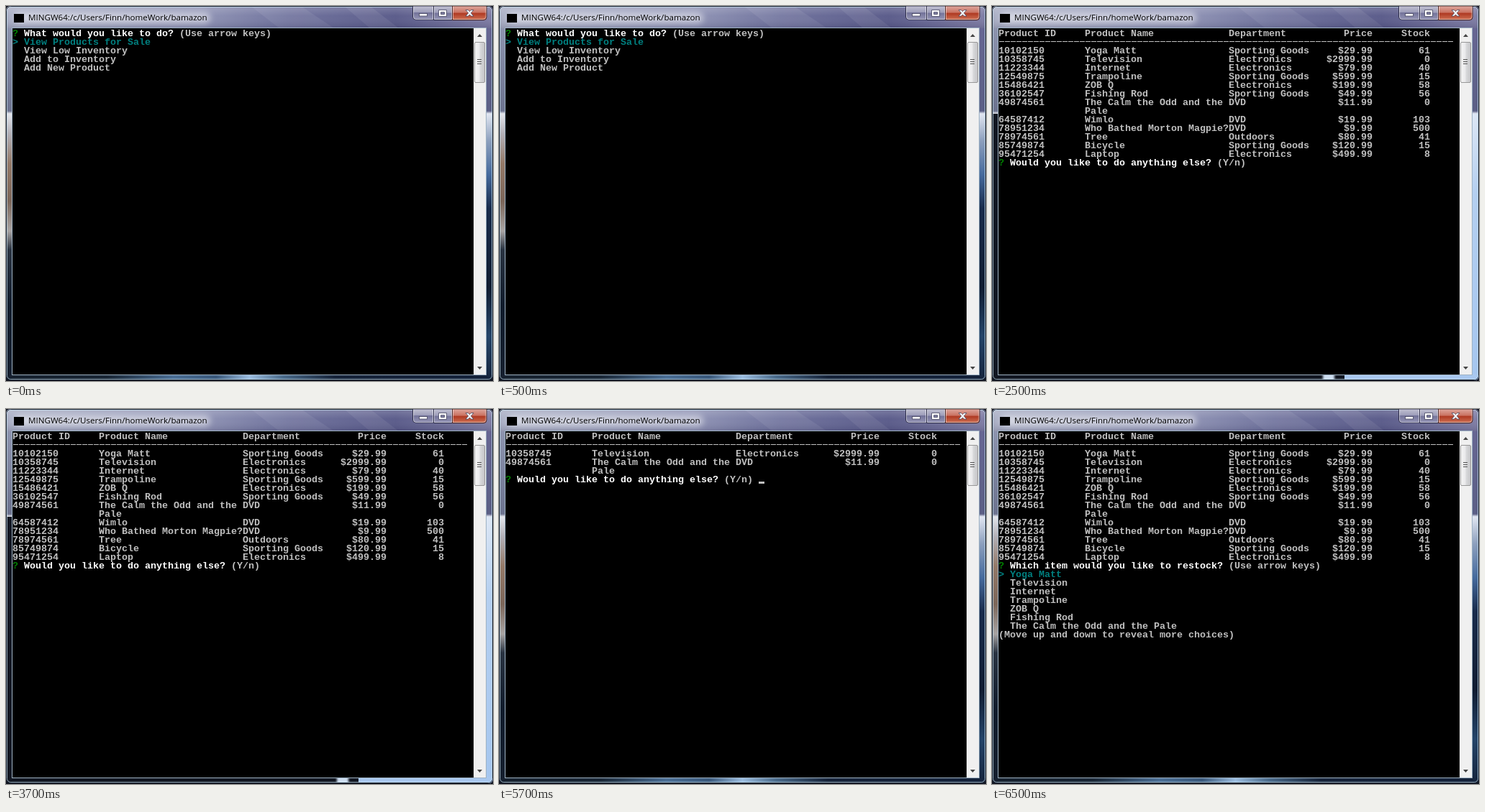
Animation, 677 px wide and 522 px high, one loop 8 s. Source, as an HTML page:

```html
<!DOCTYPE html>
<html lang="en">
<head>
<meta charset="utf-8">
<title>Terminal store manager</title>
<style>
  html, body { margin: 0; width: 100%; height: 100%; overflow: hidden; background: #10141f; }
  svg { display: block; }
  .mono text { font: bold 13.333px "Liberation Mono", "Courier New", monospace; white-space: pre; }
  .title { font: 11.6px "Open Sans", "Noto Sans", sans-serif; }
</style>
</head>
<body>
<svg width="677" height="522" viewBox="0 0 677 522">
  <defs>
    <linearGradient id="top">
      <stop offset="0" stop-color="#a9aec4"/>
      <stop offset=".4" stop-color="#8d91b3"/>
      <stop offset=".58" stop-color="#6b6e9a"/>
      <stop offset=".8" stop-color="#565787"/>
      <stop offset="1" stop-color="#7d7ba3"/>
    </linearGradient>
    <linearGradient id="shade" x2="0" y2="1">
      <stop offset="0" stop-color="#fff" stop-opacity=".22"/>
      <stop offset=".45" stop-color="#fff" stop-opacity=".04"/>
      <stop offset="1" stop-color="#15163a" stop-opacity=".15"/>
    </linearGradient>
    <linearGradient id="left" x2="0" y2="522" gradientUnits="userSpaceOnUse">
      <stop offset=".05" stop-color="#8f96b0"/>
      <stop offset=".28" stop-color="#6d7490"/>
      <stop offset=".287" stop-color="#e4e6ec"/>
      <stop offset=".34" stop-color="#b3b1b8"/>
      <stop offset=".42" stop-color="#957a68"/>
      <stop offset=".52" stop-color="#7d675a"/>
      <stop offset=".6" stop-color="#a9a5a4"/>
      <stop offset=".65" stop-color="#2a3442"/>
      <stop offset=".8" stop-color="#111c2c"/>
      <stop offset="1" stop-color="#16202f"/>
    </linearGradient>
    <linearGradient id="right" x2="0" y2="522" gradientUnits="userSpaceOnUse">
      <stop offset=".05" stop-color="#676693"/>
      <stop offset=".28" stop-color="#5b5f85"/>
      <stop offset=".287" stop-color="#e2e7f2"/>
      <stop offset=".36" stop-color="#8c9fbd"/>
      <stop offset=".45" stop-color="#456a9d"/>
      <stop offset=".54" stop-color="#182b4b"/>
      <stop offset=".75" stop-color="#101c31"/>
      <stop offset=".88" stop-color="#244469"/>
      <stop offset="1" stop-color="#15233b"/>
    </linearGradient>
    <linearGradient id="bottom">
      <stop offset="0" stop-color="#17222f"/>
      <stop offset=".2" stop-color="#1a2736"/>
      <stop offset=".34" stop-color="#4b6f96"/>
      <stop offset=".43" stop-color="#3a597c"/>
      <stop offset=".5" stop-color="#9dbfe2"/>
      <stop offset=".57" stop-color="#4b6c8c"/>
      <stop offset=".68" stop-color="#17243a"/>
      <stop offset="1" stop-color="#15233b"/>
    </linearGradient>
    <linearGradient id="sky" x2="0" y2="1">
      <stop offset="0" stop-color="#dde7f5"/>
      <stop offset=".3" stop-color="#b4cff0"/>
      <stop offset="1" stop-color="#a5c6ef"/>
    </linearGradient>
    <linearGradient id="glass" x2="0" y2="1">
      <stop offset="0" stop-color="#c2c2d3"/>
      <stop offset=".48" stop-color="#9b9bb8"/>
      <stop offset=".5" stop-color="#727299"/>
      <stop offset="1" stop-color="#9797b7"/>
    </linearGradient>
    <linearGradient id="red" x2="0" y2="1">
      <stop offset="0" stop-color="#dfa89f"/>
      <stop offset=".48" stop-color="#c9705f"/>
      <stop offset=".5" stop-color="#ad3620"/>
      <stop offset="1" stop-color="#cf7255"/>
    </linearGradient>
    <linearGradient id="thumb">
      <stop offset="0" stop-color="#f5f5f5"/>
      <stop offset=".48" stop-color="#e9e9eb"/>
      <stop offset=".52" stop-color="#d9dadc"/>
      <stop offset="1" stop-color="#c5c5c8"/>
    </linearGradient>
    <filter id="blur" x="-20%" y="-80%" width="140%" height="260%"><feGaussianBlur stdDeviation="4"/></filter>
    <filter id="soft" x="-50%" y="-50%" width="200%" height="200%"><feGaussianBlur stdDeviation="1.5"/></filter>
    <clipPath id="frame"><rect width="677" height="521" rx="6"/></clipPath>
  </defs>

  <rect width="677" height="522" fill="#10141f"/>
  <g clip-path="url(#frame)">
    <rect width="20" height="522" fill="url(#left)"/>
    <rect x="657" width="20" height="522" fill="url(#right)"/>
    <rect x="8" y="512" width="661" height="10" fill="url(#bottom)"/>
    <g id="daylight">
      <path d="M0 150h20v362h637v10H0z" fill="#121722"/>
      <rect x="657" y="150" width="20" height="372" fill="url(#sky)"/>
      <rect x="490" y="512" width="187" height="10" fill="#a9c8ef"/>
      <rect x="460" y="512" width="16" height="10" fill="#cfdff2" filter="url(#soft)"/>
    </g>
    <rect width="677" height="31" fill="url(#top)"/>
    <path d="M340 0h70l46 31h-76zM470 0h36l40 31h-40z" fill="#fff" opacity=".07"/>
    <rect width="677" height="31" fill="url(#shade)"/>
    <rect x="12" y="9" width="272" height="15" rx="7" fill="#fff" opacity=".5" filter="url(#blur)"/>
  </g>
  <rect x=".5" y=".5" width="676" height="520" rx="6" fill="none" stroke="#1b2130"/>
  <rect x="1.5" y="1.5" width="674" height="518" rx="5" fill="none" stroke="#c4e0ee" stroke-opacity=".7"/>

  <rect x="11" y="11" width="14" height="12" fill="#000"/>
  <text class="title" x="31" y="20">MINGW64:/c/Users/Finn/homeWork/bamazon</text>

  <g stroke="#2b2b48">
    <path d="M565.5 0v15q0 4 4 4H594.5V0z" fill="url(#glass)"/>
    <path d="M594.5 0V19.5H620.5V0z" fill="url(#glass)"/>
    <path d="M620.5 0V19.5H664q4 0 4-4V0z" fill="url(#red)" stroke="#47201f"/>
  </g>
  <path d="M566.5 1v14q0 3.5 3.5 3.5H593.5V1M595.5 1V18.5H619.5V1M621.5 1V18.5H663q4 0 4-3.5V1" fill="none" stroke="#fff" stroke-opacity=".5"/>
  <g fill="#fff" stroke="#45455f" stroke-width=".8">
    <rect x="574.5" y="10.5" width="11" height="3.5"/>
    <path fill-rule="evenodd" d="M601.5 5.5h11v9h-11zM604.5 8.5v3h5v-3z"/>
    <path d="M639 5.5h3.5l2 2.200 2-2.200h3.5l-3.7 4.300 3.7 4.300h-3.5l-2-2.200-2 2.200H639l3.7-4.300z"/>
  </g>

  <rect x="8.5" y="30.5" width="659" height="483" fill="#000" stroke="#9fb3c4"/>
  <rect x="650" y="31" width="17" height="482" fill="#f0f0f0"/>
  <path d="M655 43l3.5-4 3.5 4zM655 502l3.5 4 3.5-4z" fill="#444"/>
  <rect x="651.5" y="50.5" width="14" height="56" rx="1.5" fill="url(#thumb)" stroke="#979797"/>
  <path d="M655 74.5h6M655 77.5h6M655 80.5h6" stroke="#555"/>
  <g id="screens" class="mono"></g>
</svg>

<script>
const NS = "http://www.w3.org/2000/svg";
const GREY = "#c0c0c0", WHITE = "#fff", TEAL = "#008080", GREEN = "#008000";
const CELL = 8, LINE = 12, LEFT = 9, BASE = 42;
const LOOP = 8000;

const products = [
  ["10102150", "Yoga Matt", "Sporting Goods", "$29.99", "61"],
  ["10358745", "Television", "Electronics", "$2999.99", "0"],
  ["11223344", "Internet", "Electronics", "$79.99", "40"],
  ["12549875", "Trampoline", "Sporting Goods", "$599.99", "15"],
  ["15486421", "ZOB Q", "Electronics", "$199.99", "58"],
  ["36102547", "Fishing Rod", "Sporting Goods", "$49.99", "56"],
  ["49874561", "The Calm the Odd and the Pale", "DVD", "$11.99", "0"],
  ["64587412", "Wimlo", "DVD", "$19.99", "103"],
  ["78951234", "Who Bathed Morton Magpie?", "DVD", "$9.99", "500"],
  ["78974561", "Tree", "Outdoors", "$80.99", "41"],
  ["85749874", "Bicycle", "Sporting Goods", "$120.99", "15"],
  ["95471254", "Laptop", "Electronics", "$499.99", "8"]
];

function add(parent, tag, attrs, content = "") {
  const el = document.createElementNS(NS, tag);
  for (const key in attrs) el.setAttribute(key, attrs[key]);
  el.textContent = content;
  parent.appendChild(el);
  return el;
}

function put(g, col, row, str, fill = GREY) {
  add(g, "text", { x: LEFT + col * CELL, y: BASE + row * LINE, fill }, str);
}

function prompt(g, row, question, hint) {
  put(g, 0, row, "?", GREEN);
  put(g, 2, row, question, WHITE);
  put(g, question.length + 3, row, hint);
}

// First choice is the highlighted one
function choices(g, row, items) {
  put(g, 0, row, ">", TEAL);
  items.forEach((item, i) => put(g, 2, row + i, item, i ? GREY : TEAL));
}

function tableRow(g, row, [id, name, dept, price, stock]) {
  put(g, 0, row, id);
  put(g, 15, row, name);
  put(g, 40, row, dept);
  put(g, 65 - price.length, row, price);
  put(g, 75 - stock.length, row, stock);
}

// Draws the table and returns the next free row
function table(g, items) {
  tableRow(g, 0, ["Product ID", "Product Name", "Department", "Price", "Stock"]);
  add(g, "path", { d: `M${LEFT + 1} 49.5h${79 * CELL - 1}`, stroke: GREY, "stroke-dasharray": "7 1" });
  let row = 2;
  for (const [id, name, ...rest] of items) {
    const cut = name.length > 25 ? name.lastIndexOf(" ") : name.length;
    tableRow(g, row++, [id, name.slice(0, cut), ...rest]);
    if (cut < name.length) put(g, 15, row++, name.slice(cut + 1));
  }
  return row;
}

function menu(g) {
  prompt(g, 0, "What would you like to do?", "(Use arrow keys)");
  choices(g, 1, ["View Products for Sale", "View Low Inventory", "Add to Inventory", "Add New Product"]);
}

function askMore(g, row) {
  prompt(g, row, "Would you like to do anything else?", "(Y/n)");
}

function allProducts(g) {
  askMore(g, table(g, products));
}

function lowStock(g) {
  const row = table(g, products.filter(p => p[4] === "0"));
  askMore(g, row);
  add(g, "rect", { x: LEFT + 44 * CELL, y: BASE + row * LINE - 1, width: CELL, height: 3, fill: GREY });
}

function restock(g) {
  const row = table(g, products);
  prompt(g, row, "Which item would you like to restock?", "(Use arrow keys)");
  choices(g, row + 1, products.slice(0, 7).map(p => p[1]));
  put(g, 0, row + 8, "(Move up and down to reveal more choices)");
}

const host = document.getElementById("screens");
const daylight = document.getElementById("daylight");
const scenes = [[0, menu], [2500, allProducts], [4500, lowStock], [6500, restock]].map(([start, draw]) => {
  const g = add(host, "g", {});
  draw(g);
  return { start, g };
});

function show(el, on) {
  el.style.display = on ? "" : "none";
}

function render(ms) {
  const t = ms % LOOP;
  const current = scenes.filter(s => s.start <= t).pop();
  scenes.forEach(s => show(s.g, s === current));
  show(daylight, current === scenes[1]);
}

const began = performance.now();
function tick() {
  render(performance.now() - began);
  requestAnimationFrame(tick);
}
tick();
</script>
</body>
</html>
```
